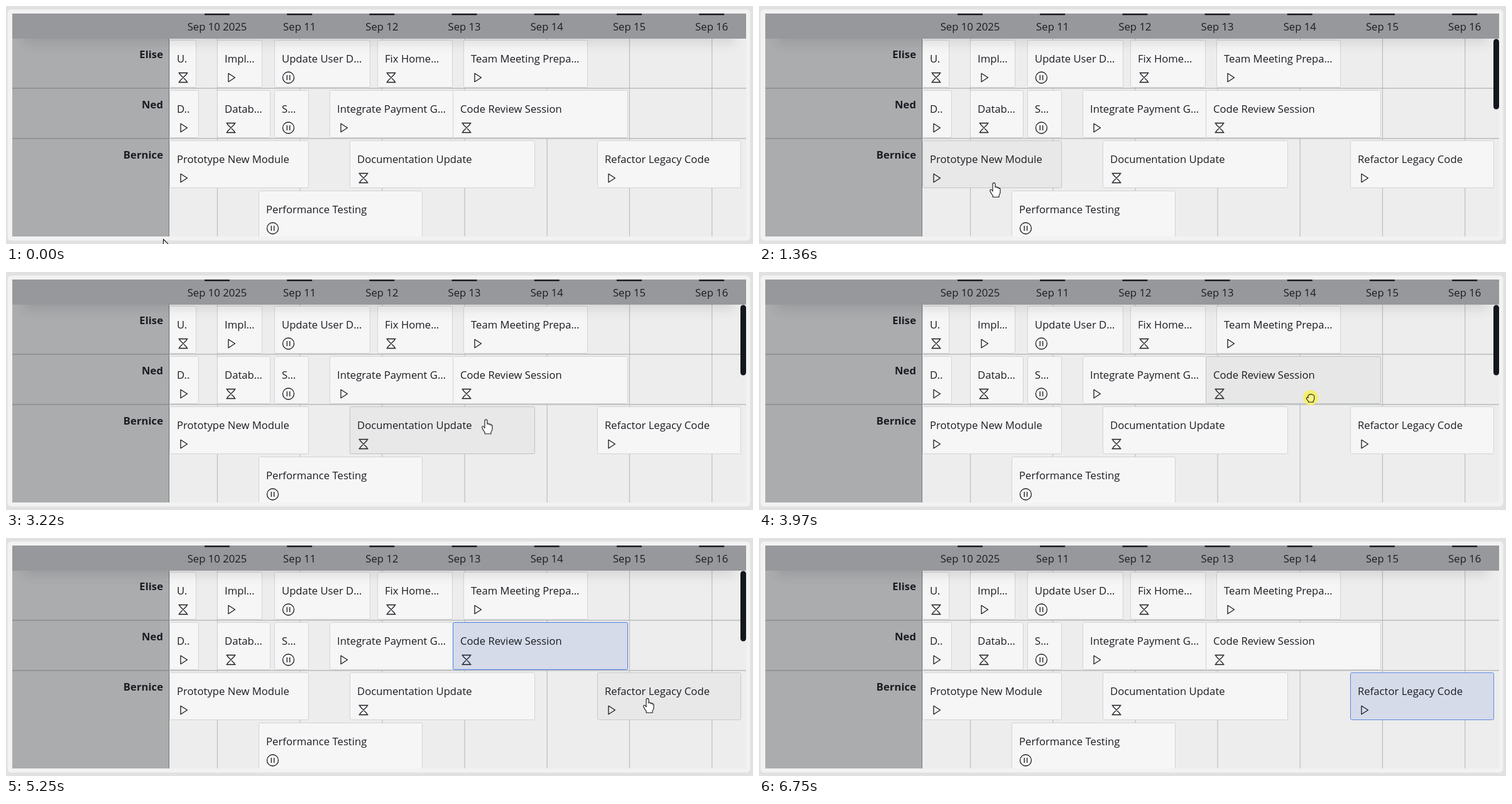
Animation, 1189 px wide and 379 px high, one loop 7.61 s. Source, as an HTML page:

```html
<!DOCTYPE html>
<html lang="en">
<head>
<meta charset="utf-8">
<title>Task timeline</title>
<style>
  html, body { margin: 0; width: 100%; height: 100%; overflow: hidden; background: #e1e1e2; }
  svg { display: block; width: 1189px; height: 379px; font: 16.7px "Open Sans", "Noto Sans", sans-serif; fill: #1b1c22; }
  .name { font-weight: 700; text-anchor: end; }
  .day { text-anchor: middle; }
  .task { fill: #f6f6f6; stroke: #d1d3d4; }
  .icon { fill: none; stroke: #1b1c22; stroke-width: 1.3; stroke-linejoin: round; }
  .pointer { fill: #fff; stroke: #111; stroke-width: 1.1; stroke-linejoin: round; }

  .task, .moving { animation-duration: 7610ms; animation-timing-function: step-end; animation-iteration-count: infinite; }
  #prototype { animation-name: prototype; }
  #testing { animation-name: testing; }
  #docs { animation-name: docs; }
  #review { animation-name: review; }
  #refactor { animation-name: refactor; }
  #scrollbar { animation-name: scrollbar; }
  #cursor { animation-name: travel; }
  #arrow { animation-name: arrow; }
  #hand { animation-name: hand; }
  #fist { animation-name: fist; }

  /* hovered: grey, selected: blue */
  @keyframes prototype {
    8.17% { fill: #e8e8e8; stroke: #c4c5c6; }
    19.69% { fill: #f6f6f6; stroke: #d1d3d4; }
  }
  @keyframes testing {
    19.69% { fill: #e8e8e8; stroke: #c4c5c6; }
    26.03% { fill: #f6f6f6; stroke: #d1d3d4; }
  }
  @keyframes docs {
    26.93% { fill: #e8e8e8; stroke: #c0c1c2; }
    45.89% { fill: #f6f6f6; stroke: #d1d3d4; }
  }
  @keyframes review {
    45.89% { fill: #e7e7e7; stroke: #c0c1c2; }
    53.08% { fill: #d5dbe9; stroke: #4a7ce0; }
    76.21% { fill: #f6f6f6; stroke: #d1d3d4; }
  }
  @keyframes refactor {
    66.32% { fill: #e8e8e8; stroke: #c8c9ca; }
    76.21%, 100% { fill: #d5dbe9; stroke: #5f8ae2; }
  }
  @keyframes scrollbar {
    0%, 88.69%, 100% { opacity: 0; }
    1.83% { opacity: 1; }
  }

  @keyframes travel {
    0% { transform: translate(250px, 371px); }
    .91% { transform: translate(262px, 362px); animation-timing-function: steps(4); }
    4.55% { transform: translate(310px, 322px); animation-timing-function: steps(4); }
    8.17% { transform: translate(346px, 289px); animation-timing-function: steps(4); }
    11.82% { transform: translate(361px, 281px); }
    17.87% { transform: translate(374px, 281px); animation-timing-function: steps(2); }
    19.69% { transform: translate(420px, 297px); animation-timing-function: steps(3); }
    22.4% { transform: translate(545px, 311px); animation-timing-function: steps(3); }
    25.12% { transform: translate(645px, 302px); animation-timing-function: steps(2); }
    26.93% { transform: translate(673px, 286px); }
    27.98% { transform: translate(680px, 282px); animation-timing-function: steps(3); }
    30.74% { transform: translate(695px, 273px); }
    38.63% { transform: translate(700px, 268px); animation-timing-function: steps(5); }
    43.17% { transform: translate(780px, 226px); animation-timing-function: steps(6); }
    48.62% { transform: translate(878px, 200px); }
    63.6% { transform: translate(886px, 204px); animation-timing-function: steps(2); }
    65.44% { transform: translate(918px, 217px); animation-timing-function: steps(4); }
    68.98% { transform: translate(1021px, 255px); animation-timing-function: steps(3); }
    71.87% { transform: translate(1057px, 264px); }
    84.09% { transform: translate(1062px, 268px); animation-timing-function: steps(4); }
    87.78%, 100% { transform: translate(1088px, 290px); }
  }
  @keyframes arrow {
    0%, 26.03%, 65.44%, 87.78% { opacity: 1; }
    8.17%, 26.93%, 66.32%, 88.69%, 100% { opacity: 0; }
  }
  @keyframes hand {
    0%, 26.03%, 50.32%, 65.44%, 74.5%, 87.78%, 100% { opacity: 0; }
    8.17%, 26.93%, 53.08%, 66.32%, 76.21% { opacity: 1; }
  }
  @keyframes fist {
    0%, 53.08%, 76.21%, 100% { opacity: 0; }
    50.32%, 74.5% { opacity: 1; }
  }
</style>
</head>
<body>
<svg viewBox="0 0 1189 379">
  <defs>
    <clipPath id="view"><path d="M10 12H1178V367H10Z"/></clipPath>
    <filter id="blur" x="-5%" y="-100%" width="110%" height="300%"><feGaussianBlur stdDeviation="9"/></filter>
    <path id="play" d="M-4 -6.7L6.5 0L-4 6.7Z"/>
    <path id="wait" d="M-7.5 -7.5H7.5M-7.5 7.5H7.5M-5.5 -7.5V-5.5L5.5 5.5V7.5M5.5 -7.5V-5.5L-5.5 5.5V7.5"/>
    <path id="pause" d="M-8.5 0A9 9 0 1 1 9.5 0A9 9 0 1 1 -8.5 0M-1.7 -4V4M2.7 -4V4"/>
  </defs>
  <rect x="2.5" y="5.5" width="1182" height="368" rx="6" fill="#f2f2f2"/>
  <g clip-path="url(#view)">
    <path d="M260 52H1178V367H260Z" fill="#ededed"/>
    <path d="M10 52H260V367H10Z" fill="#abacae"/>
    <g id="grid" stroke="#bbbebf" stroke-width="1.2"></g>
    <path d="M260 131H1178M260 211H1178" stroke="#b9bcbc" stroke-width="1.6"/>
    <path d="M10 131H260M10 211H260" stroke="#8b8c8e" stroke-width="1.4"/>
    <path d="M259.5 52V367" stroke="#77787a"/>
    <g id="tasks"></g>
    <path d="M28 30H1160V60H28Z" opacity=".11" filter="url(#blur)"/>
    <path d="M10 12H1178V52H10Z" fill="#97989b"/>
    <g id="labels"></g>
    <rect id="scrollbar" class="moving" x="1169" y="52.5" width="9" height="112" rx="4.5" fill="#15171e"/>
  </g>
  <g id="cursor" class="moving">
    <g id="arrow" class="moving"><path class="pointer" d="M.5 .5V17L4.4 13.4L7 19.5L9.8 18.3L7.2 12.4H12.4Z"/></g>
    <g id="hand" class="moving"><path class="pointer" d="M-2 2.4Q-2 .6 0 .6T2 2.4V8Q2 6.6 3.6 6.8Q5 7 5 8.8Q5.2 7.6 6.6 7.9Q7.8 8.2 7.8 9.8Q8.2 8.8 9.3 9.3Q10 9.8 10 11V15.5Q10 18 8 20.5V23.3H-1.8V20.8Q-4.2 18.5 -6 14Q-6.8 11.6 -5.2 11.3Q-3.8 11.2 -2 14Z"/></g>
    <g id="fist" class="moving">
      <circle r="12" fill="#f5ee70"/>
      <path d="M-4 1V-3Q-3.6 -5 -2 -4.3Q-1.2 -6.2 .6 -5Q2 -6 3.2 -4.2Q5.4 -4.8 5.8 -2V2Q5.6 4 4.2 5.5V7.3H-3.4V5.8Q-5.4 4 -6.8 1.5Q-7 -.8 -4 -.6" fill="#f8f38e" stroke="#22220f" stroke-width="1.1"/>
    </g>
  </g>
</svg>
<script>
  const days = ["10 2025", "11", "12", "13", "14", "15", "16"];
  const people = ["Elise", "Ned", "Bernice"];
  const rows = [
    [[260, 302, "U.", "wait"], [336, 407, "Impl…", "play"], [427, 579, "Update User D…", "pause"],
     [591, 710, "Fix Home…", "wait"], [728, 925, "Team Meeting Prepa…", "play"]],
    [[260, 306, "D..", "play"], [336, 420, "Datab…", "wait"], [427, 481, "S…", "pause"],
     [515, 711, "Integrate Payment G…", "play"], [711, 989, "Code Review Session", "wait", "review"]],
    [[260, 481, "Prototype New Module", "play", "prototype"], [547, 841, "Documentation Update", "wait", "docs"],
     [941, 1169, "Refactor Legacy Code", "play", "refactor"]],
    [[402, 662, "Performance Testing", "pause", "testing"]]
  ];

  const fill = (id, parts) => document.getElementById(id).innerHTML = parts.join("");
  const dayX = i => 336 + i * 131.2;

  const task = ([left, right, title, icon, id], y) => `
    <rect class="task" ${id ? `id="${id}"` : ""} x="${left + .5}" y="${y + .5}" width="${right - left}" height="75" rx="2"/>
    <text x="${left + 12}" y="${y + 36}">${title}</text>
    <use class="icon" href="#${icon}" x="${left + 22}" y="${y + 60}"/>`;

  fill("grid", days.map((_, i) => `<path d="M${dayX(i) + .5} 52V367"/>`));
  fill("tasks", rows.flatMap((row, r) => row.map(item => task(item, 54 + r * 80))));
  fill("labels", [
    ...days.map((day, i) => `<path d="M${dayX(i) - 20} 12h40v2.5h-40z"/><text class="day" x="${dayX(i)}" y="39">Sep ${day}</text>`),
    ...people.map((name, i) => `<text class="name" x="250" y="${83 + i * 80}">${name}</text>`)
  ]);
</script>
</body>
</html>
```
